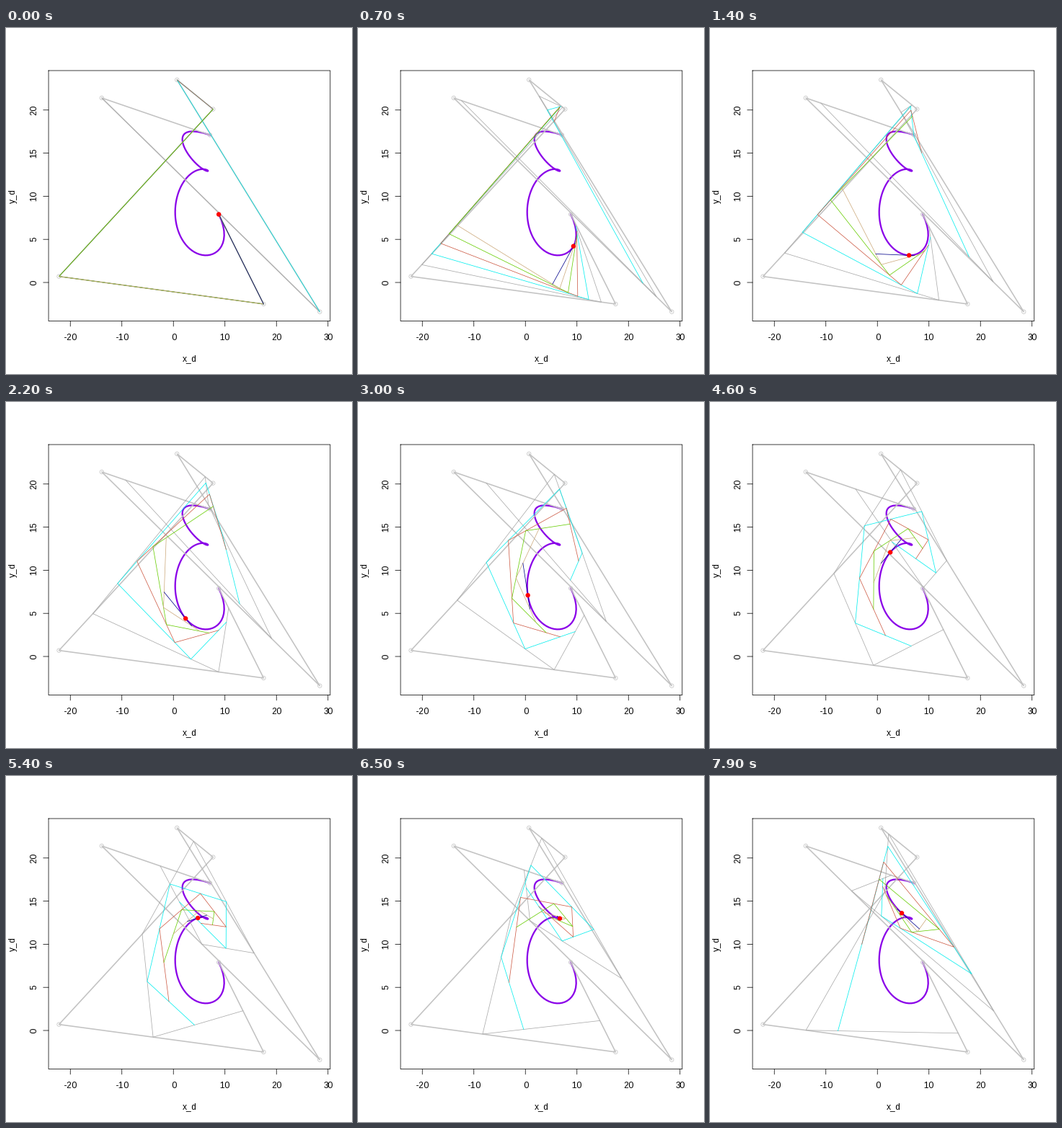
Recreate the animation shown at these times as a matplotlib script. Size 480 by 480 pixels, loop 8 s.

```python
import numpy as np
import matplotlib.pyplot as plt
from matplotlib.animation import FuncAnimation
from matplotlib.patches import Circle

plt.rcParams.update({
    "font.family": "Liberation Sans",
    "text.hinting_factor": 1,
    "path.snap": False,
    "path.simplify": False,
})

SIZE, DPI = 480, 100
PX = 72 / DPI  # points per pixel
FRAMES, INTERVAL = 80, 100
THIN = 0.75 * PX

LEFT, RIGHT, TOP, BOTTOM = 59.04, 449.76, 59.04, 406.56
LINE = 14.4  # height of one margin line

POINTS = np.array([
    (8.8, 7.9), (17.5, -2.5), (-22.2, 0.7), (7.7, 20.1),
    (0.7, 23.5), (28.4, -3.4), (-13.9, 21.4), (7.1, 17.1),
])
LEVEL_COLORS = ["#a9a9a9", "#00eeee", "#cd5b45", "#66cd00", "#cdaa7d", "#00008b"]
BASE_COLOR = "#c3c3c3"


def padded(values):
    lo, hi = values.min(), values.max()
    pad = 0.04 * (hi - lo)
    return lo - pad, hi + pad


XLIM, YLIM = padded(POINTS[:, 0]), padded(POINTS[:, 1])


def to_x(v):
    return np.interp(v, XLIM, (LEFT, RIGHT))


def to_y(v):
    return np.interp(v, YLIM, (BOTTOM, TOP))


CONTROL = np.column_stack([to_x(POINTS[:, 0]), to_y(POINTS[:, 1])])


def casteljau(t):
    """All interpolation levels below the control polygon, down to one point."""
    levels, pts = [], CONTROL
    while len(pts) > 1:
        pts = (1 - t) * pts[:-1] + t * pts[1:]
        levels.append(pts)
    return levels


# One axes over the whole stage, in pixels with y pointing down.
fig = plt.figure(figsize=(SIZE / DPI, SIZE / DPI), dpi=DPI, facecolor="white")
ax = fig.add_axes([0, 0, 1, 1])
ax.set(xlim=(0, SIZE), ylim=(SIZE, 0))
ax.axis("off")


def rule(xs, ys):
    ax.plot(xs, ys, color="black", lw=THIN)


def label(x, y, text, rotation=0):
    ax.text(x, y, text, fontsize=12 * PX, ha="center", va="baseline",
            rotation=rotation, rotation_mode="anchor")


def x_label(x, text, line):
    label(x, BOTTOM + (line + 0.83) * LINE, text)


def y_label(y, text, line):
    label(LEFT - (line + 0.17) * LINE, y, text, 90)


rule([LEFT, RIGHT, RIGHT, LEFT, LEFT], [TOP, TOP, BOTTOM, BOTTOM, TOP])
for v in range(-20, 31, 10):
    x = to_x(v)
    rule([x, x], [BOTTOM, BOTTOM + LINE / 2])
    x_label(x, str(v), 1)
for v in range(0, 21, 5):
    y = to_y(v)
    rule([LEFT, LEFT - LINE / 2], [y, y])
    y_label(y, str(v), 1)
x_label((LEFT + RIGHT) / 2, "x_d", 3)
y_label((TOP + BOTTOM) / 2, "y_d", 3)

curve = np.array([casteljau(t)[-1][0] for t in np.linspace(0, 1, 101)])
ax.plot(*curve.T, color="#8a00e8", lw=2.25 * PX, zorder=3)
ax.plot(*CONTROL.T, color=BASE_COLOR, lw=1.6 * PX, zorder=4)
for p in CONTROL:
    ax.add_patch(Circle(p, 2.7, fill=False, ec=BASE_COLOR, lw=THIN, zorder=4))

lines = [ax.plot([], [], color=c, lw=THIN, zorder=5 + i)[0]
         for i, c in enumerate(LEVEL_COLORS)]
dot = ax.add_patch(Circle(CONTROL[0], 3.2, fc="red", lw=0, zorder=12))


def update(frame):
    *levels, tip = casteljau(frame / 100)
    for line, pts in zip(lines, levels):
        line.set_data(*pts.T)
    dot.center = tip[0]
    return lines + [dot]


anim = FuncAnimation(fig, update, frames=FRAMES, interval=INTERVAL,
                     repeat=True, repeat_delay=0)
plt.show()
```
